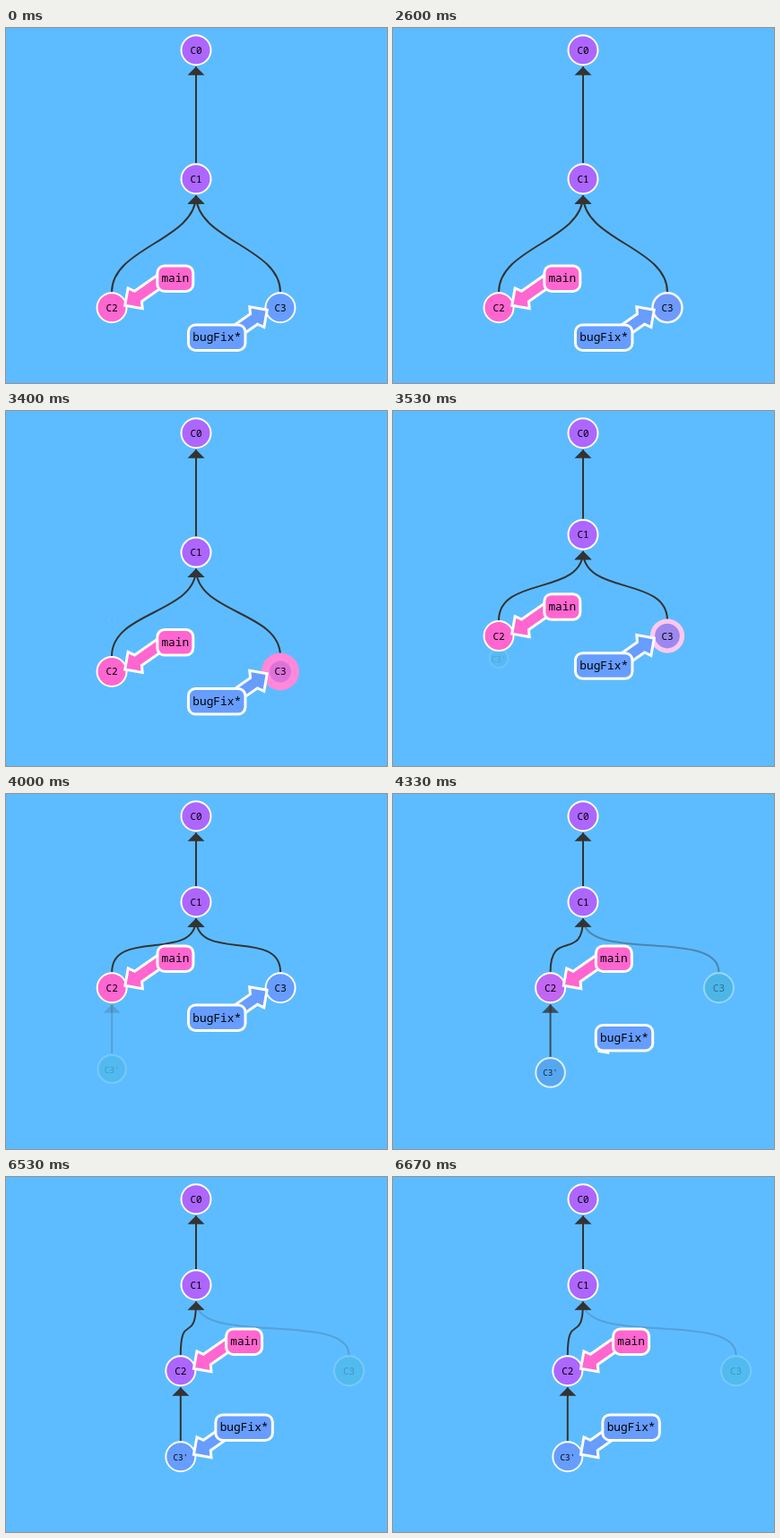
Animation, 425 px wide and 397 px high, one loop 6740 ms. Source, as an HTML page with a canvas:

```html
<!DOCTYPE html>
<html lang="en">
<head>
<meta charset="utf-8">
<title>Rebase</title>
<style>
  html, body { margin: 0; width: 100%; height: 100%; overflow: hidden; background: #5dbcff; }
  canvas { display: block; }
</style>
</head>
<body>
<canvas id="stage" width="425" height="397"></canvas>
<script>
const ctx = document.getElementById('stage').getContext('2d');
const LOOP = 6740;
const FONT = '"Noto Sans Mono", "DejaVu Sans Mono", monospace';
const EDGE = '#333';
const WHITE = [255, 255, 255];
const PURPLE = [173, 102, 255];
const PINK = [255, 102, 208];
const BLUE = [102, 157, 255];
const TEAL = [36, 178, 178];
const RADIUS = 16.5;
const TOP = 24.75;
const MIDDLE = 212;

const lerp = (a, b, p) => a + (b - a) * p;
const mix = (a, b, p) => a.map((v, i) => lerp(v, b[i], p));
const rgb = c => `rgb(${c.map(Math.round).join()})`;
const progress = (t, start, duration) => Math.min(1, Math.max(0, (t - start) / duration));

function easeInOut(n) {
  const q = 0.48 - n / 1.04;
  const root = Math.sqrt(0.1734 + q * q);
  const s = Math.min(1, Math.max(0, Math.cbrt(root - q) + Math.cbrt(-root - q) + 0.5));
  return s * s * (3 - 2 * s);
}

function bounce(n) {
  const k = 7.5625, d = 2.75;
  if (n < 1 / d) return k * n * n;
  if (n < 2 / d) return k * (n - 1.5 / d) ** 2 + 0.75;
  if (n < 2.5 / d) return k * (n - 2.25 / d) ** 2 + 0.9375;
  return k * (n - 2.625 / d) ** 2 + 0.984375;
}

function text(label, x, y, size, weight) {
  ctx.font = `${weight} ${size}px ${FONT}`;
  ctx.textAlign = 'center';
  ctx.fillStyle = '#000';
  ctx.fillText(label, x, y);
}

// Edge from a child up to its parent, with an arrowhead under the parent.
function edge(child, parent, alpha = 1) {
  const tail = child.y - 17.5, head = parent.y + 18.5;
  if (tail < head + 9.5) return;
  ctx.globalAlpha = alpha;
  ctx.strokeStyle = ctx.fillStyle = EDGE;
  ctx.lineWidth = 2;
  ctx.beginPath();
  ctx.moveTo(child.x, tail);
  ctx.bezierCurveTo(child.x, tail - 50, parent.x, head + 50, parent.x, head);
  ctx.stroke();
  ctx.beginPath();
  ctx.moveTo(parent.x, head);
  ctx.lineTo(parent.x + 9.5, head + 9.5);
  ctx.lineTo(parent.x - 9.5, head + 9.5);
  ctx.fill();
  ctx.globalAlpha = 1;
}

function commit({ x, y, label, fill, ring = WHITE, width = 2, r = RADIUS, alpha = 1 }) {
  ctx.globalAlpha = alpha;
  ctx.fillStyle = rgb(fill);
  ctx.strokeStyle = rgb(ring);
  ctx.lineWidth = width;
  ctx.beginPath();
  ctx.arc(x, y, r, 0, 2 * Math.PI);
  ctx.fill();
  ctx.stroke();
  text(label, x, y + 4, label.length > 2 ? 9.2 : 11, 500);
  ctx.globalAlpha = 1;
}

// Arrow outline as [along, across] from its tip.
const ARROW = [[0, 0], [14, -14], [18, -7], [60, -7], [60, 7], [18, 7], [14, 14]];
const ANGLE = -35 * Math.PI / 180;

// flip: 1 puts the label up and right of the commit, -1 down and left.
function branch({ x, y }, label, width, fill, flip = 1) {
  const cos = Math.cos(ANGLE), sin = Math.sin(ANGLE);
  ctx.fillStyle = rgb(fill);
  ctx.strokeStyle = '#fff';
  ctx.lineWidth = 3;
  ctx.beginPath();
  for (const [along, across] of ARROW) {
    ctx.lineTo(x + flip * (14.7 + along * cos - across * sin),
               y + flip * (-2.4 + along * sin + across * cos));
  }
  ctx.closePath();
  ctx.fill();
  ctx.stroke();

  const cx = x + flip * 70.8, cy = y - flip * 33 + 0.4;
  ctx.beginPath();
  ctx.roundRect(cx - width / 2, cy - 14.25, width, 28.5, 8);
  ctx.fill();
  ctx.stroke();
  text(label, cx, cy + 4.3, 12.83, 400);
}

function draw(t) {
  const glow = easeInOut(progress(t, 2510, 560));
  const lift = easeInOut(progress(t, 3235, 510));
  const birth = bounce(progress(Math.min(t, 4000), 3261, 940));
  const shift = easeInOut(progress(t, 3985, 530));
  const lit = glow * (1 - lift);

  const row = lerp(144, 96, lift);
  const bottom = TOP + 288;
  const c0 = { x: MIDDLE, y: TOP, label: 'C0', fill: PURPLE };
  const c1 = { x: MIDDLE, y: TOP + row, label: 'C1', fill: PURPLE };
  const c2 = {
    x: lerp(MIDDLE - 94, 194.8, shift), y: TOP + 2 * row, label: 'C2',
    fill: mix(PINK, PURPLE, shift)
  };
  const c3 = {
    x: lerp(MIDDLE + 94, 382.6, shift), y: c2.y, label: 'C3',
    fill: mix(mix(BLUE, PINK, lit), TEAL, shift),
    ring: mix(WHITE, PINK, lit), width: lerp(2, 11, lit), alpha: lerp(1, 0.2, shift)
  };
  const copy = {
    x: c2.x, y: lerp(lerp(bottom - 96, bottom, birth), bottom, shift), label: "C3'",
    fill: mix(TEAL, BLUE, shift),
    r: RADIUS * lerp(birth, 1, shift), alpha: lerp(0.2 * Math.min(lift, birth), 1, shift)
  };

  ctx.fillStyle = '#5dbcff';
  ctx.fillRect(0, 0, 425, 397);

  edge(c1, c0);
  edge(c3, c1, c3.alpha);
  edge(c2, c1);
  edge(copy, c2, copy.alpha);
  [copy, c0, c1, c3, c2].forEach(commit);

  branch(c2, 'main', 40, PINK);
  const bugFix = { x: lerp(MIDDLE + 94, 194.8, shift), y: lerp(c2.y, bottom, shift) };
  branch(bugFix, 'bugFix*', 63.5, BLUE, lerp(-1, 1, shift));
}

const begin = performance.now();
function tick() {
  draw((performance.now() - begin) % LOOP);
  requestAnimationFrame(tick);
}
tick();
</script>
</body>
</html>
```
